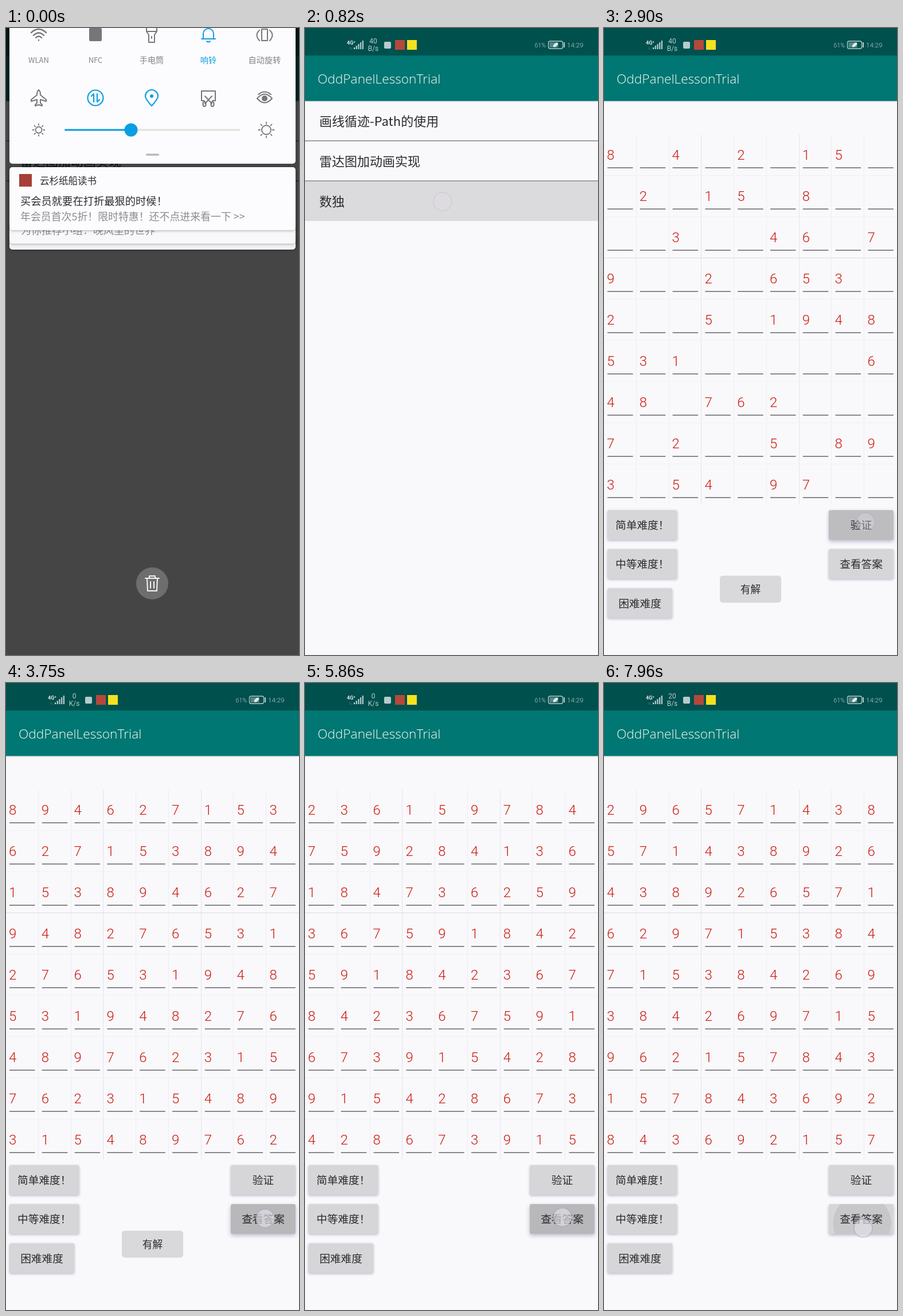
These frames come from a looping animation (511x1095 px, 7990 ms). An HTML page with a canvas:

```html
<!DOCTYPE html>
<html lang="zh">
<head>
<meta charset="utf-8">
<title>数独</title>
<style>
html, body { margin: 0; width: 100%; height: 100%; overflow: hidden; background: #f9f8fb; }
canvas { display: block; width: 511px; height: 1095px; }
</style>
</head>
<body>
<canvas id="stage" width="511" height="1095"></canvas>
<script>
const ctx = document.getElementById('stage').getContext('2d');
const W = 511, H = 1095, LOOP = 7990;
// The TC face centres full-width punctuation in its cell.
const CJK = '"Noto Sans CJK TC Light", "Noto Sans CJK TC", "Noto Sans CJK SC", "Noto Sans CJK", sans-serif';
const LATIN = '"Open Sans", "Noto Sans", sans-serif';
const DIGITS = 'Roboto, "Open Sans", sans-serif';
const PAGE = '#f9f8fb', INK = '#2c2b2e', GREY = '#77757c', BLUE = '#0a9fe0';

const clamp = v => Math.max(0, Math.min(1, v));
const ramp = (t, from, to) => clamp((t - from) / (to - from));
const easeOut = (p, n = 2) => 1 - (1 - p) ** n;

// ---- boards ----
const EASY = '8.4.2.15. .2.15.8.. ..3..46.7 9..2.653. 2..5.1948 531.....6 48.762... 7.2..5.89 3.54.97..'.split(' ');
const EASY_FULL = '894627153 627153894 153894627 948276531 276531948 531948276 489762315 762315489 315489762'.split(' ');
const MID_FULL = '236159784 759284136 184736259 367591842 591842367 842367591 673915428 915428673 428673915'.split(' ');
const HARD_FULL = '296571438 571438926 438926571 629715384 715384269 384269715 962157843 157843692 843692157'.split(' ');

function thin(rows, keep, seed) {
  return rows.map((row, r) => [...row].map((d, c) => {
    const n = Math.sin((r * 9 + c + 1) * 12.9898 + seed) * 43758.5453;
    return n - Math.floor(n) < keep ? d : '.';
  }).join(''));
}

const BOARDS = [
  [0, []], [2080, EASY], [3740, EASY_FULL], [4770, thin(MID_FULL, 0.43, 3)],
  [5740, MID_FULL], [6620, thin(HARD_FULL, 0.32, 8)], [7510, HARD_FULL]
];
const SPEEDS = [[0, ['40', 'B/s']], [3640, ['0', 'K/s']], [6640, ['20', 'B/s']]];
const at = (steps, t) => steps.filter(s => s[0] <= t).pop()[1];

// ---- buttons and taps ----
const BUTTONS = {
  easy: ['简单难度！', 6, 842, 121.5],
  mid: ['中等难度！', 6, 910, 121.5],
  hard: ['困难难度', 6, 978.5, 113],
  check: ['验证', 392, 842, 113],
  solve: ['查看答案', 392, 910, 113]
};
const TAPS = [
  { on: 'easy', start: 1960, hold: 160, x: 70, y: 868 },
  { on: 'check', start: 2670, hold: 190, x: 456, y: 863 },
  { on: 'solve', start: 3610, hold: 180, x: 452, y: 935 },
  { on: 'mid', start: 4630, hold: 200, x: 68, y: 938 },
  { on: 'solve', start: 5600, hold: 270, x: 449, y: 933 },
  { on: 'hard', start: 6400, hold: 260, x: 64, y: 1004 },
  { on: 'solve', start: 7220, hold: 290, x: 450, y: 937 },
  { on: 'solve', start: 7900, hold: 300, x: 452, y: 952 }
];
const ROW_TAP = { start: 640, hold: 130, x: 240, y: 303 };

// ---- drawing helpers ----
function text(str, x, y, size, color, { font = CJK, align = 'left', weight = 300 } = {}) {
  ctx.font = `${weight} ${size}px ${font}`;
  ctx.textAlign = align;
  ctx.textBaseline = 'alphabetic';
  ctx.fillStyle = color;
  ctx.fillText(str, x, y);
}
function rect(x, y, w, h, color) {
  ctx.fillStyle = color;
  ctx.fillRect(x, y, w, h);
}
function box(x, y, w, h, r, color) {
  ctx.beginPath();
  ctx.roundRect(x, y, w, h, r);
  ctx.fillStyle = color;
  ctx.fill();
}
function disc(x, y, r, color) {
  ctx.beginPath();
  ctx.arc(x, y, r, 0, 7);
  ctx.fillStyle = color;
  ctx.fill();
}
function layer(draw, alpha = 1, dx = 0, dy = 0) {
  if (alpha <= 0) return;
  ctx.save();
  ctx.globalAlpha *= alpha;
  ctx.translate(dx, dy);
  draw();
  ctx.restore();
}
function shadow(color, blur, dy) {
  ctx.shadowColor = color;
  ctx.shadowBlur = blur;
  ctx.shadowOffsetY = dy;
}
function icon(path, x, y, color = GREY, width = 2) {
  layer(() => {
    ctx.strokeStyle = color;
    ctx.lineWidth = width;
    ctx.lineCap = ctx.lineJoin = 'round';
    ctx.stroke(new Path2D(path));
  }, 1, x, y);
}
const ring = r => `M${r} 0A${r} ${r} 0 1 1 ${-r} 0A${r} ${r} 0 1 1 ${r} 0`;

// ---- app pages ----
function toolbar() {
  layer(() => {
    shadow('rgba(0,0,0,.25)', 3, 0.5);
    rect(0, 0, W, 127.5, '#007772');
  });
  text('OddPanelLessonTrial', 22, 97, 22.7, '#f6fcfb', { font: LATIN });
}

function listPage(t) {
  rect(0, 0, W, H, PAGE);
  const press = ramp(t, ROW_TAP.start, ROW_TAP.start + 100);
  rect(0, 268, W, 69, `rgba(0,0,0,${0.12 * press})`);
  ['画线循迹-Path的使用', '雷达图加动画实现', '数独'].forEach((label, i) => {
    text(label, 25, 171 + i * 70, 22, INK);
    if (i < 2) rect(0, 196.3 + i * 70, W, 1.5, '#858387');
  });
  toolbar();
}

function grid(rows) {
  for (let i = 1; i < 9; i++) {
    rect(Math.round(i * 56.75) - 1, 186, 1, 646, i % 3 ? '#efedf4' : '#e7e3ef');
    rect(0, 185 + i * 72, W, 1, i === 3 ? '#dddbe0' : '#f2f0f5');
  }
  for (let r = 0; r < 9; r++) {
    for (let c = 0; c < 9; c++) {
      const x = 6 + c * 56.8, y = 244 + r * 72;
      rect(x, y - 0.6, 44.5, 1.5, '#66656a');
      const d = rows[r] && rows[r][c];
      if (d && d !== '.') text(d, x - 1, y - 14, 24, '#cc1b10', { font: DIGITS });
    }
  }
}

function ripple(tap, t, [, x, y, w]) {
  const dt = t - tap.start;
  const p = clamp(dt / 120);
  const fade = 1 - ramp(dt, tap.hold, tap.hold + 280);
  if (dt < 0 || fade <= 0) return;
  ctx.save();
  ctx.beginPath();
  ctx.roundRect(x, y, w, 52, 3);
  ctx.clip();
  const cx = tap.x + (x + w / 2 - tap.x) * p, cy = tap.y + (y + 26 - tap.y) * p;
  disc(cx, cy, 67 * easeOut(p), `rgba(0,0,0,${0.14 * p * fade})`);
  ctx.restore();
}

function button(name, t) {
  const b = BUTTONS[name], [label, x, y, w] = b;
  const taps = TAPS.filter(tap => tap.on === name);
  const lift = Math.max(0, ...taps.map(({ start, hold }) =>
    ramp(t, start, start + 100) * (1 - ramp(t, start + hold, start + hold + 200))));
  layer(() => {
    shadow('rgba(60,50,110,.32)', 4 + 3 * lift, 1.5 + 1.5 * lift);
    box(x, y, w, 52, 3, '#d6d5d8');
  });
  taps.forEach(tap => ripple(tap, t, b));
  text(label, x + w / 2, y + 33, 18.7, INK, { align: 'center' });
}

function toast(t) {
  const alpha = ramp(t, 2780, 2880) * (1 - ramp(t, 4780, 4980));
  layer(() => {
    box(202, 956.5, 107, 47, 5, '#d9d8db');
    text('有解', 255.5, 987, 17.7, INK, { align: 'center' });
  }, alpha);
}

function gamePage(t) {
  rect(0, 0, W, H, PAGE);
  grid(at(BOARDS, t));
  Object.keys(BUTTONS).forEach(name => button(name, t));
  toolbar();
}

function touch({ start, hold, x, y }, t) {
  const alpha = ramp(t, start - 1, start + 30) * (1 - ramp(t, start + hold, start + hold + 90));
  layer(() => {
    disc(x, y, 16, 'rgba(226,225,230,.66)');
    icon(ring(16), x, y, 'rgba(165,160,195,.6)', 1.5);
  }, alpha);
}

function statusIcons(t) {
  const pale = '#b5cccb', roboto = { font: DIGITS, weight: 400 };
  text('4G⁺', 73, 29, 9, '#dbe8e7', { ...roboto, weight: 700 });
  text('1↓', 77, 38, 6, '#6f9997', roboto);
  for (let i = 0; i < 5; i++) rect(85 + i * 3.7, 34 - i * 3, 2.2, 3 + i * 3, pale);
  at(SPEEDS, t).forEach((s, i) =>
    text(s, 119, 27 + i * 13, 12, pale, { ...roboto, align: 'center' }));
  box(138, 24, 12, 12, 2, pale);
  rect(157, 21, 17, 17, '#b5483b');
  rect(178, 21, 17, 17, '#f4e11f');
  text('61%', 420, 34, 10.5, pale, { font: DIGITS, align: 'right' });
  layer(() => {
    ctx.strokeStyle = pale;
    ctx.lineWidth = 1.3;
    ctx.beginPath();
    ctx.roundRect(424.5, 23, 25, 13, 3);
    ctx.stroke();
  });
  rect(426.5, 25, 15, 9, 'rgba(181,204,203,.45)');
  rect(451, 25, 2, 9, pale);
  ctx.beginPath();
  ctx.ellipse(437, 29.5, 5, 2.6, -0.7, 0, 7);
  ctx.fillStyle = '#e3eeed';
  ctx.fill();
  text('14:29', 457, 34, 11.8, pale, { font: DIGITS });
}

// ---- notification shade ----
function sun(x, y, r, reach) {
  let path = ring(r);
  for (let i = 0; i < 8; i++) {
    const a = i * Math.PI / 4, c = Math.cos(a), s = Math.sin(a);
    path += `M${c * (r + 3)} ${s * (r + 3)}L${c * reach} ${s * reach}`;
  }
  icon(path, x, y, GREY, 1.8);
}

function quickPanel() {
  box(6, -30, 499, 267, 5, '#fcfbfe');
  const cols = [57, 156, 254, 353, 451];
  icon('M-13 -4Q0 -16 13 -4M-9 1Q0 -8 9 1M-5 5Q0 0 5 5M0 9L0 9.5', cols[0], 12, GREY, 2.4);
  box(cols[1] - 11, 0, 22, 23, 2, GREY);
  icon('M-9 -12V-6L-5 0V13H5V0L9 -6V-12M-9 -6H9M0 3V6', cols[2], 12);
  icon('M-12 7H12M-9 7V-2A9 9 0 0 1 9 -2V7M-3 11Q0 14 3 11', cols[3], 12, BLUE);
  icon('M-5 -10H5V10H-5ZM-9 -8Q-18 0 -9 10M9 -8Q18 0 9 10', cols[4], 12);
  ['WLAN', 'NFC', '手电筒', '响铃', '自动旋转'].forEach((s, i) =>
    text(s, cols[i], 61, i < 2 ? 13 : 14.2, i === 3 ? BLUE : '#85838a', { align: 'center' }));

  icon('M0 -14Q-3 -12 -3 -5L-13 3V6L-3 3V9L-6 12V14L0 12L6 14V12L3 9V3L13 6V3L3 -5Q3 -12 0 -14Z', cols[0], 122);
  icon(ring(13.5) + 'M-3 7V-7L-7 -3M3 -7V7L7 3', cols[1], 122, BLUE, 2.2);
  icon('M0 14Q-11 2 -11 -3A11 11 0 0 1 11 -3Q11 2 0 14Z', cols[2], 122, BLUE, 2.2);
  disc(cols[2], 119, 3, BLUE);
  icon('M-7 5H-12V-12H12V5H7M-6 -3L6 10M6 -3L-6 10M-5 11A2.5 2.5 0 1 1 -9 11A2.5 2.5 0 1 1 -5 11M9 11A2.5 2.5 0 1 1 5 11A2.5 2.5 0 1 1 9 11', cols[3], 122);
  icon('M-13 1Q0 -14 13 1Q0 16 -13 1ZM-11 -6Q0 -15 11 -6', cols[4], 122);
  disc(cols[4], 123, 5, GREY);

  sun(57, 178, 5.5, 10.5);
  sun(454, 178, 8, 13.5);
  box(102, 176.5, 306, 3, 1.5, '#e4e1dc');
  box(102, 176.5, 116, 3, 1.5, BLUE);
  disc(218, 178, 11.5, BLUE);
  box(244, 219.5, 23, 3.5, 2, '#b9b8bb');
}

// Sheets overlap, so their seams show as brighter bands while fading.
function notices(p) {
  const sheet = (y, h, color) => layer(() => {
    shadow('rgba(0,0,0,.3)', 5, 1);
    box(6, y, 499, h, 5, color);
  });
  sheet(363, 24, '#f3f2f5');
  sheet(341, 35.5, '#f8f7fa');
  layer(() => {
    disc(34, 363, 10, '#c8463d');
    icon('M-4 -2L0 2L4 -2', 278, 365);
  }, p);
  text('为你推荐小组：晚风里的世界', 26 + 34 * p, 360 + 9 * p, 18, '#8d8b91');
  sheet(243, 110, '#fcfbfe');
  rect(23, 255, 22, 22, '#a63f36');
  text('云杉纸船读书', 59, 273, 16.5, INK);
  text('买会员就要在打折最狠的时候！', 25, 309, 18.3, INK);
  text('年会员首次5折！限时特惠！还不点进来看一下 >>', 25, 336, 17.9, '#8d8b91');
}

function shade(t) {
  const q = Math.max(0, (t - 30) / 80), p = clamp(q);
  const scrim = q < 1 ? 0.72 - 0.66 * q : 0.06 * clamp(2 - q);
  rect(0, 0, W, H, `rgba(0,0,0,${scrim})`);
  layer(() => {
    disc(255, 970, 28, 'rgba(152,152,152,.5)');
    icon('M-12 -9H12M-5 -9V-13H5V-9M-9 -9L-8 13H8L9 -9M-3 -3V8M3 -3V8', 255, 970, '#f6f6f6', 2);
  }, 1 - 0.85 * q);
  layer(() => {
    quickPanel();
    notices(p);
  }, 1 - 0.58 * q, 0, -241 * Math.min(q, 1.8));
}

// ---- timeline ----
function draw(t) {
  ctx.clearRect(0, 0, W, H);
  const slide = easeOut(ramp(t, 830, 1280), 3);
  if (slide < 1) layer(() => listPage(t), 1, -W * 0.3 * slide);
  if (slide > 0) layer(() => gamePage(t), 1, W * (1 - slide));
  rect(0, 0, W, 48, '#00504e');
  layer(() => statusIcons(t), ramp(t, 200, 420));
  toast(t);
  [ROW_TAP, ...TAPS].forEach(tap => touch(tap, t));
  if (t < 300) shade(t);
}

function tick() {
  draw(performance.now() % LOOP);
  requestAnimationFrame(tick);
}
tick();
</script>
</body>
</html>
```
